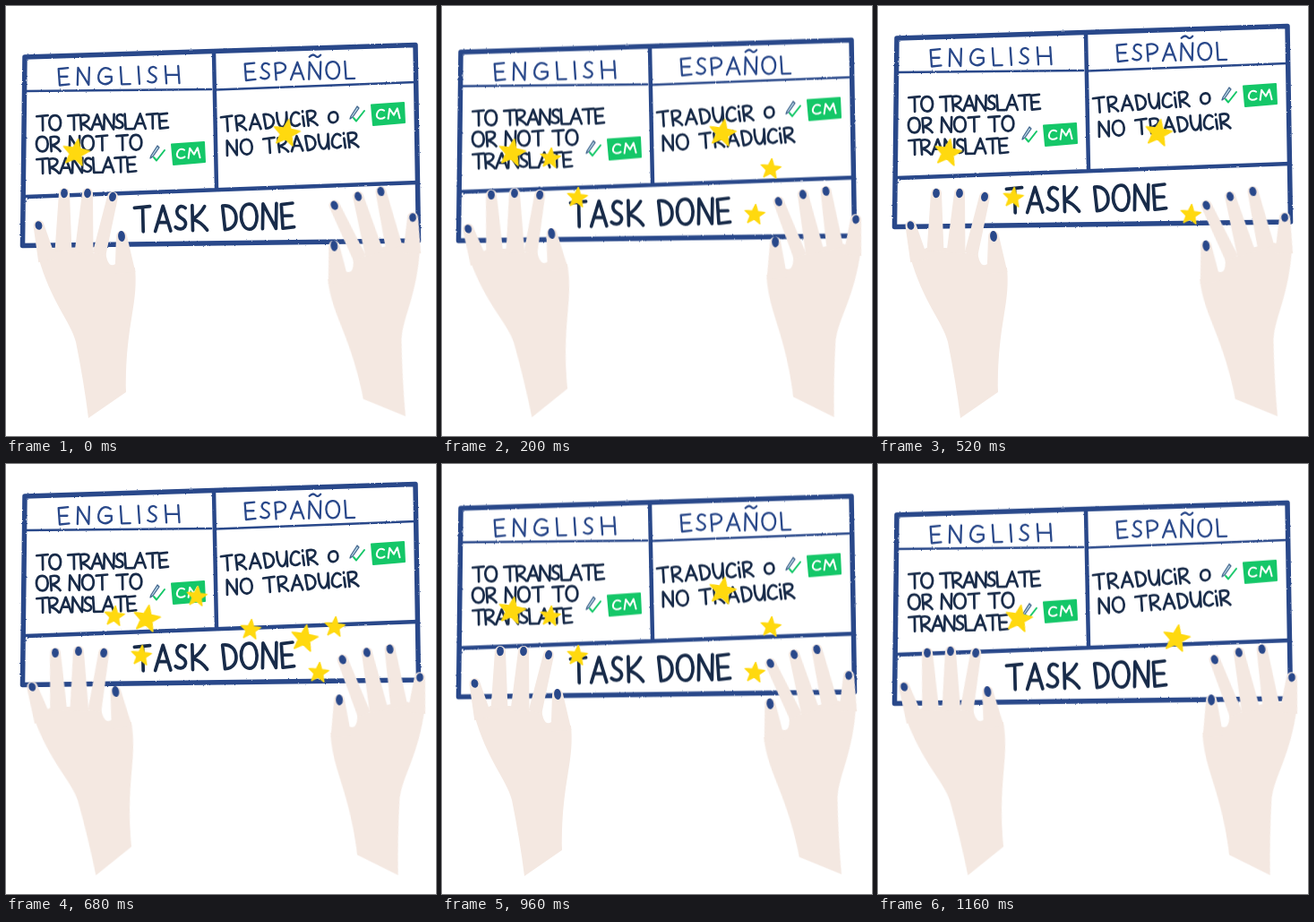
An HTML page for the animation above (1200 ms loop, 480 by 480 pixels).

```html
<!DOCTYPE html>
<html lang="en">
<head>
<meta charset="utf-8">
<title>Task done</title>
<style>
  html, body { margin: 0; width: 100%; height: 100%; overflow: hidden; background: #fff; }
  svg { display: block; width: 100vw; height: 100vh; }
  .pen { fill: none; stroke-linecap: round; stroke-linejoin: round; }
  .pen path { vector-effect: non-scaling-stroke; }
</style>
</head>
<body>
<svg viewBox="0 0 480 480">
  <defs>
    <filter id="rough" filterUnits="userSpaceOnUse" x="0" y="20" width="480" height="270" color-interpolation-filters="sRGB">
      <feTurbulence type="fractalNoise" baseFrequency="0.45" numOctaves="2" seed="4"/>
      <feDisplacementMap in="SourceGraphic" scale="2" xChannelSelector="R" yChannelSelector="G"/>
    </filter>
  </defs>
  <g id="board">
    <g class="pen" stroke="#29488a" filter="url(#rough)">
      <path d="M21 57L457 43.500L460.500 262L18.500 267.500Z" fill="#fff" stroke-width="5.500"/>
      <path d="M232 51L235 204M22 213L460 197" stroke-width="4.500"/>
      <path d="M22 95L229 93M234 93.500L457 85" stroke-width="2.700"/>
    </g>
    <g id="words"></g>
  </g>
  <g id="stars"></g>
  <g id="hands"></g>
</svg>
<script>
const NS = 'http://www.w3.org/2000/svg';
const STEPS = 30, LOOP = 1200;
const BLUE = '#29488a', INK = '#182b49', SKIN = '#f4e8e1', GREEN = '#14c768', GOLD = '#ffd90f';
const $ = id => document.getElementById(id);

function add(parent, tag, attrs = {}) {
  const el = document.createElementNS(NS, tag);
  for (const k in attrs) el.setAttribute(k, attrs[k]);
  return parent.appendChild(el);
}

// Holds pose(step) for one step each, in an endless loop
function play(el, pose) {
  const keys = [];
  for (let i = 0; i <= STEPS; i++)
    keys.push({ ...pose(i % STEPS), offset: i / STEPS, easing: 'step-end' });
  el.animate(keys, { duration: LOOP, iterations: Infinity });
}

// Hand lettering: width and pen strokes on a line 20 high
const GLYPHS = {
  ' ': [6, ''],
  A: [15, 'M0 20L8 0L15 20M3 13H12'],
  C: [12, 'M12 3C3 -6 -4 15 3 18Q7 21 12 17'],
  D: [13, 'M2 20L0 1C16 -1 18 20 2 20'],
  E: [12, 'M11 0L0 1L1 20L12 19M1 10H10'],
  G: [17, 'M15 3C4 -6 -4 14 4 18Q10 22 16 16V11H9'],
  H: [16, 'M0 0L1 20M15 0L16 20M1 10H15'],
  I: [1, 'M0 0L1 20'],
  K: [15, 'M1 0V20M13 1Q8 8 1 11Q9 13 15 20'],
  L: [11, 'M0 0L1 20H11'],
  M: [18, 'M0 20L3 0L9 13L15 0L18 20'],
  N: [14, 'M0 20L1 0L13 20L14 0'],
  'Ñ': [14, 'M0 20L1 0L13 20L14 0M1 -6Q5 -10 8 -7T14 -8'],
  O: [16, 'M8 0C-3 0 -2 20 8 20S18 0 8 0Z'],
  o: [13, 'M7 4C-2 4 -2 18 6 18S15 4 7 4Z'],
  P: [12, 'M1 20L0 1C16 -3 16 13 1 12'],
  R: [13, 'M1 20L0 1C15 -3 15 10 1 12Q8 14 13 20'],
  S: [11, 'M10 2C4 -3 -3 6 6 10S7 22 0 17'],
  T: [15, 'M0 1L15 0M8 1V20'],
  U: [13, 'M0 0C-1 26 13 26 13 0V20'],
  i: [1, 'M0 7L1 20M0 0V1']
};

const HEAD = { wide: 0.96, tall: 0.96, pen: 2.3, color: BLUE };
const BODY = { wide: 0.83, tall: 0.83, pen: 2.7, color: INK };
const TITLE = { wide: 1.15, tall: 1.4, pen: 3.7, color: INK };
const TAG = { wide: 0.72, tall: 0.55, pen: 2, color: '#fff' };

function write(text, x, y, turn, gap, { wide, tall, pen, color }) {
  const g = add($('words'), 'g', {
    class: 'pen', stroke: color, 'stroke-width': pen, role: 'img',
    'aria-label': text, transform: `translate(${x} ${y}) rotate(${turn})`
  });
  let at = 0;
  for (const ch of text) {
    const [w, d] = GLYPHS[ch];
    if (d) add(g, 'path', { d, transform: `translate(${at} ${-20 * tall}) scale(${wide} ${tall})` });
    at += w * wide + gap;
  }
}

// Pencil, tick and green tag
function badge(x, y) {
  const g = add($('words'), 'g', { class: 'pen', transform: `translate(${x} ${y})` });
  add(g, 'path', { d: 'M1 3.500L37 1L38 23L3 26Z', fill: GREEN, stroke: GREEN, 'stroke-width': 2 });
  add(g, 'path', { d: 'M-15 5L-22 16L-23 19L-20 17L-13 7Z', fill: '#b9d7e6', stroke: '#45688f', 'stroke-width': 1.3 });
  add(g, 'path', { d: 'M-19 18L-16 21.500L-7 10', stroke: GREEN, 'stroke-width': 2 });
  write('CM', x + 7, y + 19.5, -3, 4, TAG);
}

write('ENGLISH', 59, 88.5, -1, 9.3, HEAD);
write('ESPAÑOL', 267, 83, -1, 5.8, HEAD);
write('TO TRANSLATE', 34.5, 139, -1, 1.4, BODY);
write('OR NOT TO', 34, 162.5, -1, 2.6, BODY);
write('TRANSLATE', 34.5, 187, -1, 1.3, BODY);
write('TRADUCiR o', 241, 140, -3.8, 4, BODY);
write('NO TRADUCiR', 247, 167, -3.8, 3.8, BODY);
write('TASK DONE', 144, 252, -1.3, 5.4, TITLE);
badge(184, 151);
badge(407, 107);

play($('board'), i => ({
  transform: `translateY(${-11 * (1 - Math.cos(2 * Math.PI * i / STEPS))}px)`
}));

function star(x, y, r, turn, start, on, period) {
  const points = Array.from({ length: 10 }, (_, k) => {
    const a = k * Math.PI / 5, q = k % 2 ? r * 0.43 : r;
    return [q * Math.sin(a), -q * Math.cos(a)].map(v => v.toFixed(2));
  }).join(' ');
  const el = add($('stars'), 'polygon', {
    points, fill: GOLD, stroke: GOLD, 'stroke-width': 1.6, 'stroke-linejoin': 'round',
    transform: `translate(${x} ${y}) rotate(${turn})`
  });
  play(el, i => ({ opacity: i >= start && (i - start) % period < on ? 1 : 0 }));
}

// Blinking: first step, steps lit, period
const large = (x, y, ...blink) => star(x, y, 15.5, 10, ...blink);
const small = (x, y, ...blink) => star(x, y, 11.5, 6, ...blink);
large(78, 164, 0, 6, 10);
large(313, 142, 0, 6, 10.5);
large(157, 173, 6, 5, 10);
large(333, 195, 6, 5, 10);
small(121, 170, 4, 6, 9.5);
small(367, 182, 4, 6, 9.5);
small(151, 214, 3, 5, 10);
small(349, 233, 3, 5, 10);
small(213, 148, 7, 3, 9.5);
small(273, 185, 7, 3, 9.5);

// A finger tapers from its base to a round tip with a nail
function finger(g, x, y, bx, by, half, nail = 5.2) {
  const turn = Math.atan2(x - bx, by - y) * 180 / Math.PI;
  const len = Math.hypot(x - bx, y - by);
  const f = add(g, 'g', { transform: `translate(${x} ${y}) rotate(${turn})` });
  add(f, 'path', { d: `M${-half} ${len}L-6 0A6 6 0 0 1 6 0L${half} ${len}Z`, fill: SKIN });
  add(f, 'ellipse', { rx: 3.9, ry: nail, fill: BLUE });
}

function hand(place) {
  const g = add(add($('hands'), 'g', { transform: place }), 'g');
  add(g, 'path', {
    d: 'M92 460Q87 420 78 375C72 352 50 330 36 280L54 270L76 270L98 276L111 272' +
       'Q113 294 122 288L144 292C148 335 133 355 134 431Z',
    fill: SKIN
  });
  finger(g, 36.5, 245, 46, 284, 10, 4.8);
  finger(g, 65, 209, 64, 274, 9.5);
  finger(g, 91, 209, 87, 276, 10.5);
  finger(g, 119, 213, 104, 277, 7.5);
  finger(g, 129, 257, 133, 298, 11.5, 6);
  g.style.transformOrigin = '85px 346px';
  play(g, i => ({ transform: `rotate(${i % 10 < 5 ? 0 : -4.2}deg)` }));
}

hand('');
hand('translate(446 458) rotate(-12.4) scale(-1 1) translate(-92 -460)');
</script>
</body>
</html>
```
